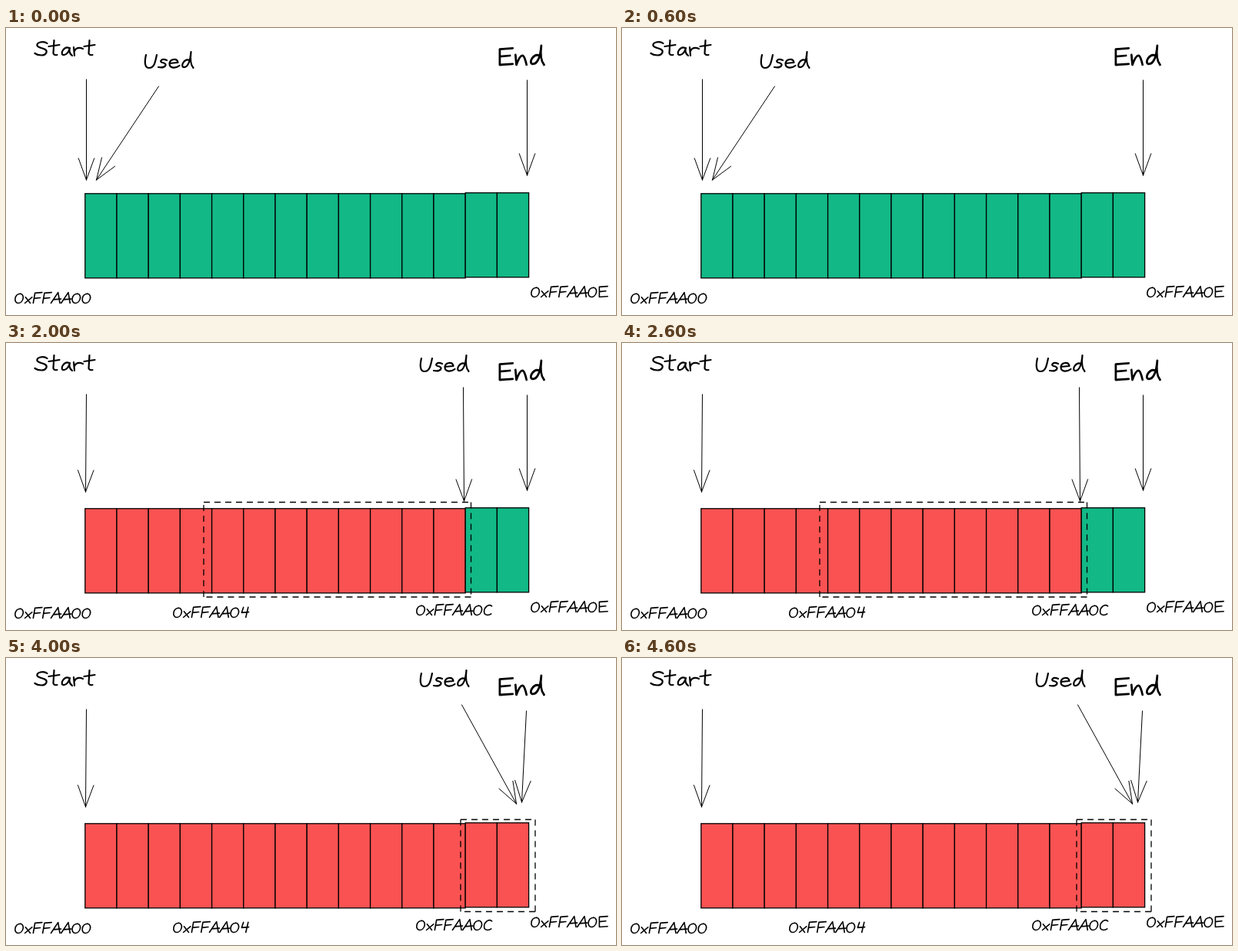
An HTML page for the animation above (5000 ms loop, 793 px wide and 374 px high).

```html
<!DOCTYPE html>
<html lang="en">
<head>
<meta charset="utf-8">
<title>Memory buffer filling up</title>
<style>
  html, body { margin: 0; width: 100%; height: 100%; overflow: hidden; background: #fff; }
  svg { display: block; }
  .ink { fill: none; stroke: #000; stroke-linecap: round; stroke-linejoin: round; }
  .thin { stroke-width: 1; }
  .dash { stroke-width: 1.3; stroke-dasharray: 8 6; stroke-linecap: butt; }
  text { font-family: "Open Sans", sans-serif; fill: transparent; }
</style>
</head>
<body>
<svg id="stage" width="793" height="374" viewBox="0 0 793 374"></svg>
<script>
const STEP = 1000;
const GREEN = '#12b886', RED = '#fa5252';
const CELLS = 14, LEFT = 102.8, PITCH = 41.2, TOP = 215.8, HEIGHT = 110;

// Pen strokes of the handwriting: [advance, path], baseline at y = 0.
const PEN = {
  S: [18, 'M16-16C11-20 2-17 3-13C5-9 17-10 15-4C13 1 4 0 0-3'],
  t: [15.5, 'M7-20L6-3Q7 0 11-1M0-12L14-14'],
  a: [16, 'M11-10C5-13-1-3 3-1C8 0 11-6 12-10Q10-4 15 0'],
  r: [14.5, 'M1-11L2 0M2-6Q5-12 13-9'],
  U: [18, 'M2-17C0-8 0 0 6 0C13 0 14-8 16-17'],
  s: [13.5, 'M11-10C4-13 1-8 5-7C13-6 10 1 0-1'],
  e: [16, 'M1-6L12-7C11-13 2-12 1-6C1 1 9 1 14-3'],
  d: [17, 'M11-10C5-13-1-3 3-1C9 0 12-9 13-21Q11-6 16 0'],
  E: [18, 'M16-18L2-17L2 0L16-1M2-9L13-10'],
  n: [16, 'M1-11L2 0Q6-11 9-10Q11-9 13 0'],
  0: [17, 'M9-16C-1-15-2-1 5 0C14 1 18-15 9-16'],
  x: [13, 'M1-10L9 0M12-10L0 0'],
  F: [16, 'M1 0L4-17L16-18M3-8L13-9'],
  A: [17.2, 'M-1 0L11-18L14 0M3-6L16-7'],
  4: [15, 'M5-17L2-8L14-9M13-17L9 0'],
  C: [15, 'M14-15C8-20 1-12 1-6C1 1 9 1 13-2']
};

function write(word, x, y, size, weight) {
  let pen = 0;
  const strokes = [...word].map(ch => {
    const [advance, d] = PEN[ch];
    const path = `<path transform="translate(${pen})" d="${d}"/>`;
    pen += advance;
    return path;
  }).join('');
  return `<g transform="translate(${x} ${y}) scale(${size})">
    <g class="ink" stroke-width="${weight}" aria-hidden="true">${strokes}</g>
    <text font-size="26">${word}</text></g>`;
}

const title = (word, x, y) => write(word, x, y, 1, 2.2);
const address = (word, x, y) => write(word, x, y, 0.77, 2.1);

function arrow([x1, y1, x2, y2]) {
  const back = Math.atan2(y1 - y2, x1 - x2);
  const barb = turn => {
    const a = back + turn * Math.PI / 9;
    return `M${x2} ${y2}L${x2 + 30 * Math.cos(a)} ${y2 + 30 * Math.sin(a)}`;
  };
  return `<path class="ink thin" d="M${x1} ${y1}L${x2} ${y2}${barb(1)}${barb(-1)}"/>`;
}

function buffer(used) {
  let out = '';
  for (let i = 0; i < CELLS; i++) {
    const y = i < CELLS - 2 ? TOP : TOP - 1;
    out += `<rect x="${LEFT + i * PITCH}" y="${y}" width="${PITCH}" height="${HEIGHT}"
      fill="${i < used ? RED : GREEN}" stroke="#000" stroke-width="1.3"/>`;
  }
  return out;
}

// Each side is its own stroke, so the dashes restart at every corner.
const dashedBox = ([l, t, r, b]) =>
  `<path class="ink dash" d="M${l} ${t}H${r}M${r} ${t}V${b}M${r} ${b}H${l}M${l} ${b}V${t}"/>`;

const START = [104.5, 67, 103.5, 194], END = [677.5, 68, 677.5, 192];
const scenes = [
  { used: 0, label: [180, 52], start: [104.5, 67, 104.5, 198], pointer: [198.5, 76, 117.5, 198] },
  { used: 4, label: [213, 34], pointer: [263.5, 61.5, 264, 209], box: [97, 211, 278, 332], inset: true },
  { used: 12, label: [538, 37], pointer: [594.5, 58, 595.5, 206], box: [257, 207.5, 604.5, 331] },
  { used: 13, label: [538, 37], pointer: [594.5, 58, 634.5, 206], box: [591.5, 209, 645, 329.5] },
  { used: 14, label: [538, 37], pointer: [592.5, 61, 663.5, 190], box: [591, 210.5, 688, 330.5], end: [676.5, 69, 670.5, 188] }
];

function draw(s) {
  const art = [
    buffer(s.used),
    s.box ? dashedBox(s.box) : '',
    title('Start', 37.5, 36),
    title('Used', ...s.label),
    write('End', 639.5, 48, 1.2, 2.3),
    arrow(s.start || START),
    arrow(s.pointer),
    arrow(s.end || END),
    address('0xFFAA00', 11.5, 358.5),
    address('0xFFAA0E', 682.5, 350.5),
    s.used >= 4 ? address('0xFFAA04', 217.5, 357.5) : '',
    s.used >= 12 ? address('0xFFAA0C', 533.5, 354.5) : ''
  ].join('');
  if (!s.inset) return `<g>${art}</g>`;
  return `<g><g transform="translate(4 3.3) scale(.99)">${art}</g>
    <path d="M0 0H4V374H0ZM789 0H793V374H789Z"/></g>`;
}

const stage = document.getElementById('stage');
stage.innerHTML = scenes.map(draw).join('');
const layers = [...stage.children];
const begin = performance.now();

function tick() {
  const now = Math.floor((performance.now() - begin) / STEP) % scenes.length;
  layers.forEach((layer, i) => { layer.style.display = i === now ? '' : 'none'; });
  requestAnimationFrame(tick);
}
tick();
</script>
</body>
</html>
```
